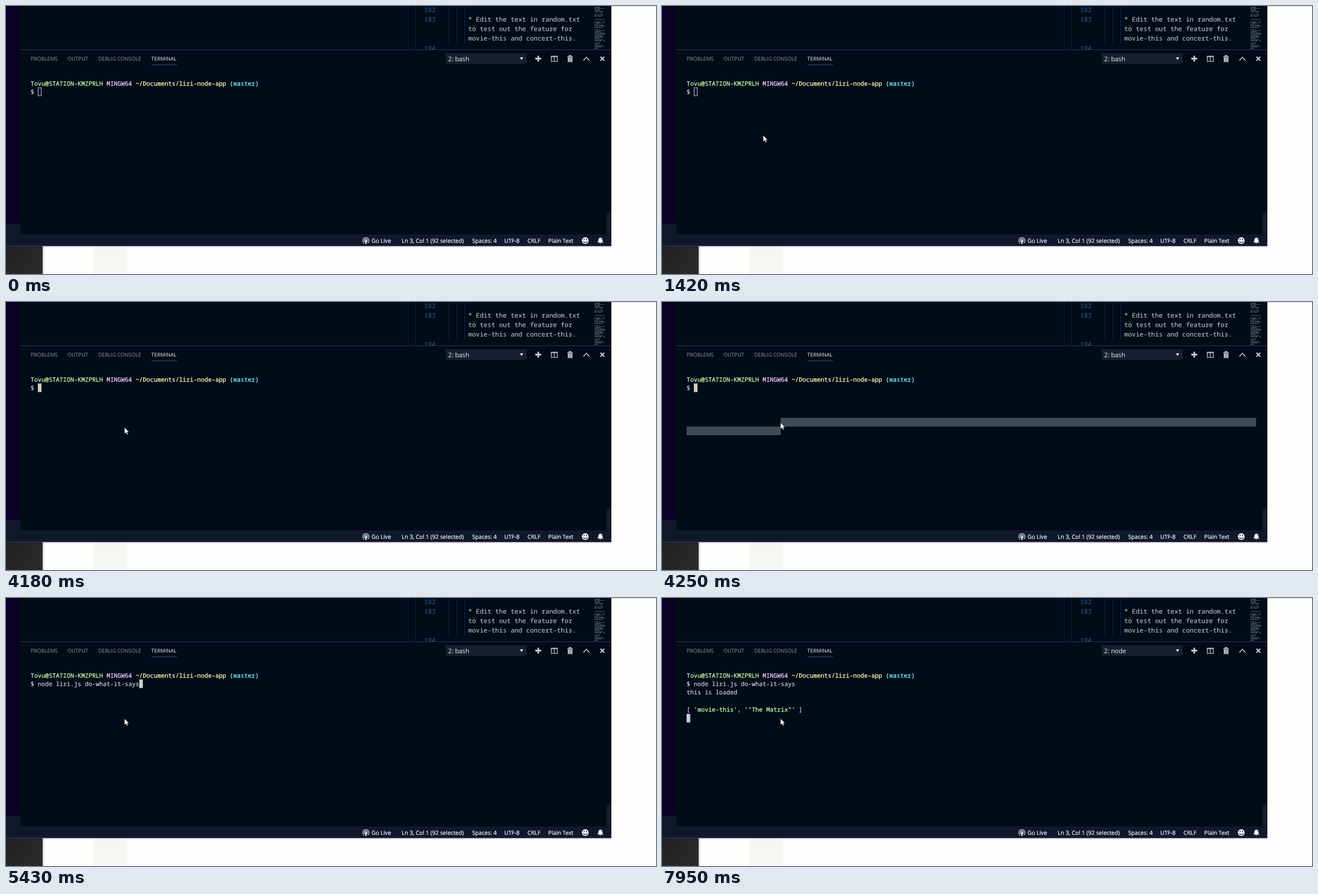
Write an HTML page with a canvas that moves like this. It is 1163 px wide and 481 px high and loops after 8 s.

```html
<!DOCTYPE html>
<html lang="en">
<head>
<meta charset="utf-8">
<title>Terminal session</title>
<style>
  html, body { margin: 0; width: 100%; height: 100%; overflow: hidden; background: #fefefd; }
  canvas, svg { position: absolute; left: 0; top: 0; width: 1163px; height: 481px; display: block; }
  text { white-space: pre; text-rendering: geometricPrecision; }
  text, tspan { fill: currentColor; stroke: currentColor; stroke-width: 0; }
  .term { font: 10.8px "Noto Sans Mono", monospace; color: #dcdfe0; }
  .term text { stroke-width: .15px; }
  .term tspan { stroke-width: .3px; }
  .code { font: 11.5px "Noto Sans Mono", monospace; color: #d4d4d4; }
  .num { color: #2c5f92; }
  .tab { font: 9.4px "Open Sans", sans-serif; color: #92979c; }
  .active { color: #f0f0f0; }
  .status { font: 10.2px "Open Sans", sans-serif; color: #fff; }
  .status text { stroke-width: .2px; }
  .menu { font: 11.3px "Open Sans", sans-serif; color: #f4f4f4; }
  .green { color: #bdfba6; }
  .pink { color: #f5c6fc; }
  .yellow { color: #fff3b2; }
  .cyan { color: #74f6ff; }
</style>
</head>
<body>
<canvas id="base" width="1163" height="481"></canvas>
<svg viewBox="0 0 1163 481">
  <defs><clipPath id="editor"><rect width="1083" height="78"/></clipPath></defs>
  <g class="code" clip-path="url(#editor)">
    <g class="num">
      <text x="748" y="11">182</text>
      <text x="748" y="28">183</text>
      <text x="748" y="79.5">184</text>
    </g>
    <text x="827" y="28">* Edit the text in random.txt</text>
    <text x="827" y="45.2">to test out the feature for</text>
    <text x="827" y="62.4">movie-this and concert-this.</text>
  </g>

  <g class="tab">
    <text x="44" y="98.3">PROBLEMS</text>
    <text x="110" y="98.3">OUTPUT</text>
    <text x="165" y="98.3">DEBUG CONSOLE</text>
    <text x="260" y="98.3" class="active">TERMINAL</text>
  </g>
  <g class="menu">
    <text x="791" y="99.3" data-to="7480">2: bash</text>
    <text x="791" y="99.3" data-from="7480">2: node</text>
  </g>

  <g class="status">
    <text x="654" y="424.6">Go Live</text>
    <text x="708" y="424.6">Ln 3, Col 1 (92 selected)</text>
    <text x="834" y="424.6">Spaces: 4</text>
    <text x="891.5" y="424.6">UTF-8</text>
    <text x="933" y="424.6">CRLF</text>
    <text x="970" y="424.6">Plain Text</text>
  </g>

  <g fill="#414b54" data-from="4250" data-to="4880">
    <rect x="212.5" y="208" width="850.5" height="15.5"/>
    <rect x="44" y="223.5" width="168.5" height="15.5"/>
  </g>

  <g class="term">
    <text x="44" y="142.6"><tspan class="green">Tovu@STATION-KMZPRLH</tspan> <tspan class="pink">MINGW64</tspan> <tspan class="yellow">~/Documents/liri-node-app</tspan> <tspan class="cyan">(master)</tspan></text>
    <text x="44" y="158">$</text>
    <text x="56.96" y="158" data-from="4880" data-to="5430">clear</text>
    <text x="56.96" y="158" data-from="5430">node liri.js do-what-it-says</text>
    <text x="44" y="173.4" data-from="7630">this is loaded</text>
    <text x="44" y="204.3" data-from="7950">[ <tspan class="green">'movie-this'</tspan>, <tspan class="green">'"The Matrix"'</tspan> ]</text>
  </g>

  <rect id="caret" width="6.5" height="15.4" fill="#ccc" data-from="4090"/>
  <rect x="57.5" y="146.8" width="5.6" height="14.2" fill="none" stroke="#ccc" data-to="4090"/>
  <path id="mouse" d="M0 0V11.6L2.7 9.1L4.5 13L6.4 12.2L4.7 8.4H8.2Z" fill="#fff" stroke="#000" stroke-width=".5"/>
</svg>

<script>
const ctx = document.getElementById('base').getContext('2d');
const caret = document.getElementById('caret');
const mouse = document.getElementById('mouse');
const timed = [...document.querySelectorAll('[data-from], [data-to]')];
const LOOP = 8000, CELL = 6.48, ROW = 15.43;

function box(x, y, w, h, color) {
  ctx.fillStyle = color;
  ctx.fillRect(x, y, w, h);
}

function stroke(d, color, width) {
  ctx.strokeStyle = color;
  ctx.lineWidth = width;
  ctx.stroke(new Path2D(d));
}

function fill(d, color) {
  ctx.fillStyle = color;
  ctx.fill(new Path2D(d));
}

function fade(x0, y0, x1, y1, from, to) {
  const g = ctx.createLinearGradient(x0, y0, x1, y1);
  g.addColorStop(0, from);
  g.addColorStop(1, to);
  return g;
}

function drawDesktop() {
  box(0, 0, 1163, 481, '#fefefd');
  box(1083, 0, 80, 1, '#d9d9d9');
  box(156, 431, 60, 50, '#f6f7f3');
  box(0, 431, 65, 50, fade(0, 431, 65, 481, '#222', '#2b2b2b'));
  box(65, 431, 1, 50, '#77757f');
  box(66, 431, 1, 50, '#c9c7d0');
  box(67, 431, 1017, 2, fade(0, 431, 0, 433, '#bcbac6', '#fefefd'));
  box(1083, 0, 2, 431, fade(1083, 0, 1085, 0, '#dcdce0', '#fefefd'));
}

function drawMinimap() {
  let seed = 7;
  const rnd = () => (seed = seed * 16807 % 2147483647) / 2147483647;
  for (let y = 0; y < 77; y += 2) {
    if (rnd() < 0.14) continue;
    const end = 1058 + rnd() * 14;
    for (let x = 1053; x < end; x++)
      if (rnd() < 0.82) box(x, y, 1, 1, `rgba(200,206,212,${0.3 + rnd() * 0.4})`);
  }
}

function drawWindow() {
  box(0, 0, 1083, 431, '#000c18');
  box(0, 0, 26, 391, '#0a0224');
  box(0, 391, 26, 40, '#10192c');
  box(26, 410, 1057, 21, '#10192c');
  box(0, 430, 1083, 1, '#3f3a58');
  box(719, 0, 1, 78, '#0d1a2c');
  box(732, 0, 1, 78, '#162236');
  for (const x of [792, 806, 820]) box(x, 0, 1, 67, '#002952');
  drawMinimap();
  box(26, 78, 1057, 1, '#3b2c55');
  box(260, 105, 46, 1, '#4c3d68');
  box(1074, 371, 9, 38, '#151c2b');
  box(787, 85, 144, 19, '#181f2f');
}

function drawIcons() {
  const light = '#d2d2d2';
  fill('M919.6 92H925.4L922.5 97Z', '#f0f0f0');
  stroke('M947 94.5H957.5M952.2 89.3V99.8', light, 2.8);
  stroke('M975.5 90.5H986.5V99.5H975.5ZM981 90V100', light, 1.2);
  box(975, 89.5, 12, 2, light);
  stroke('M1004.5 91H1014M1007.5 90V89H1011V90', light, 1.3);
  fill('M1005.2 92.5H1013.4V100.5H1005.2Z', light);
  stroke('M1007.6 93.5V99.5M1009.3 93.5V99.5M1011 93.5V99.5', '#4a525c', 0.7);
  stroke('M1033 98L1038.6 92L1044.2 98', light, 1.5);
  stroke('M1063.5 91L1070.5 98M1070.5 91L1063.5 98', light, 2);

  stroke('M641 425.6A5.5 5.5 0 1 1 647 425.6M642 423.2A3 3 0 1 1 646 423.2', '#fff', 1.1);
  fill('M642.6 420.8A1.4 1.4 0 1 1 645.4 420.8L644.9 427H643.1Z', '#fff');
  fill('M1030.4 421A6 6 0 1 1 1042.4 421A6 6 0 1 1 1030.4 421Z', '#fff');
  box(1033.3, 418.2, 1.8, 2, '#10192c');
  box(1037.7, 418.2, 1.8, 2, '#10192c');
  stroke('M1032.8 422.3Q1036.4 427 1040 422.3', '#10192c', 1.2);
  fill('M1058 424.6Q1060 423 1060 419.5Q1060.3 416.5 1063.5 415.6Q1066.7 416.5 1067 419.5Q1067 423 1069 424.6ZM1062 425.3H1065Q1063.5 427.6 1062 425.3Z', '#fff');
}

// The pointer is sampled in steps, as in a screen recording.
function mouseAt(t) {
  if (t < 120) return null;
  if (t < 710) {
    const x = 767 - 540 * Math.floor((t - 120) / 73.75) / 7;
    return [x, 384 + 92 * ((x - 500) / 270) ** 2];
  }
  if (t < 870) return null;
  if (t < 3940) {
    const p = Math.min(7, Math.floor((t - 870) / 78.57)) / 7;
    const e = 1 - (1 - p) ** 2;
    return [226 - 45 * e, 472 - 240 * e];
  }
  if (t < 4010) return [206, 232];
  if (t < 4170) return [212, 232];
  if (t < 4250) return [212, 225];
  return [212, 216.5];
}

// Column and row of the caret
function caretAt(t) {
  if (t < 4880) return [2, 1];
  if (t < 5430) return [7, 1];
  if (t < 7400) return [30, 1];
  if (t < 7630) return [0, 2];
  if (t < 7950) return [0, 3];
  return [0, 5];
}

function show(el, on) {
  el.setAttribute('visibility', on ? 'visible' : 'hidden');
}

function render(now) {
  const t = now % LOOP;
  for (const el of timed)
    show(el, t >= (el.dataset.from || 0) && t < (el.dataset.to || LOOP));
  const [col, row] = caretAt(t);
  caret.setAttribute('x', 44 + col * CELL);
  caret.setAttribute('y', 130.8 + row * ROW);
  const pos = mouseAt(t);
  show(mouse, pos);
  if (pos) mouse.setAttribute('transform', `translate(${pos})`);
}

drawDesktop();
drawWindow();
drawIcons();

const start = performance.now();
function tick() {
  render(performance.now() - start);
  requestAnimationFrame(tick);
}
tick();
</script>
</body>
</html>
```
